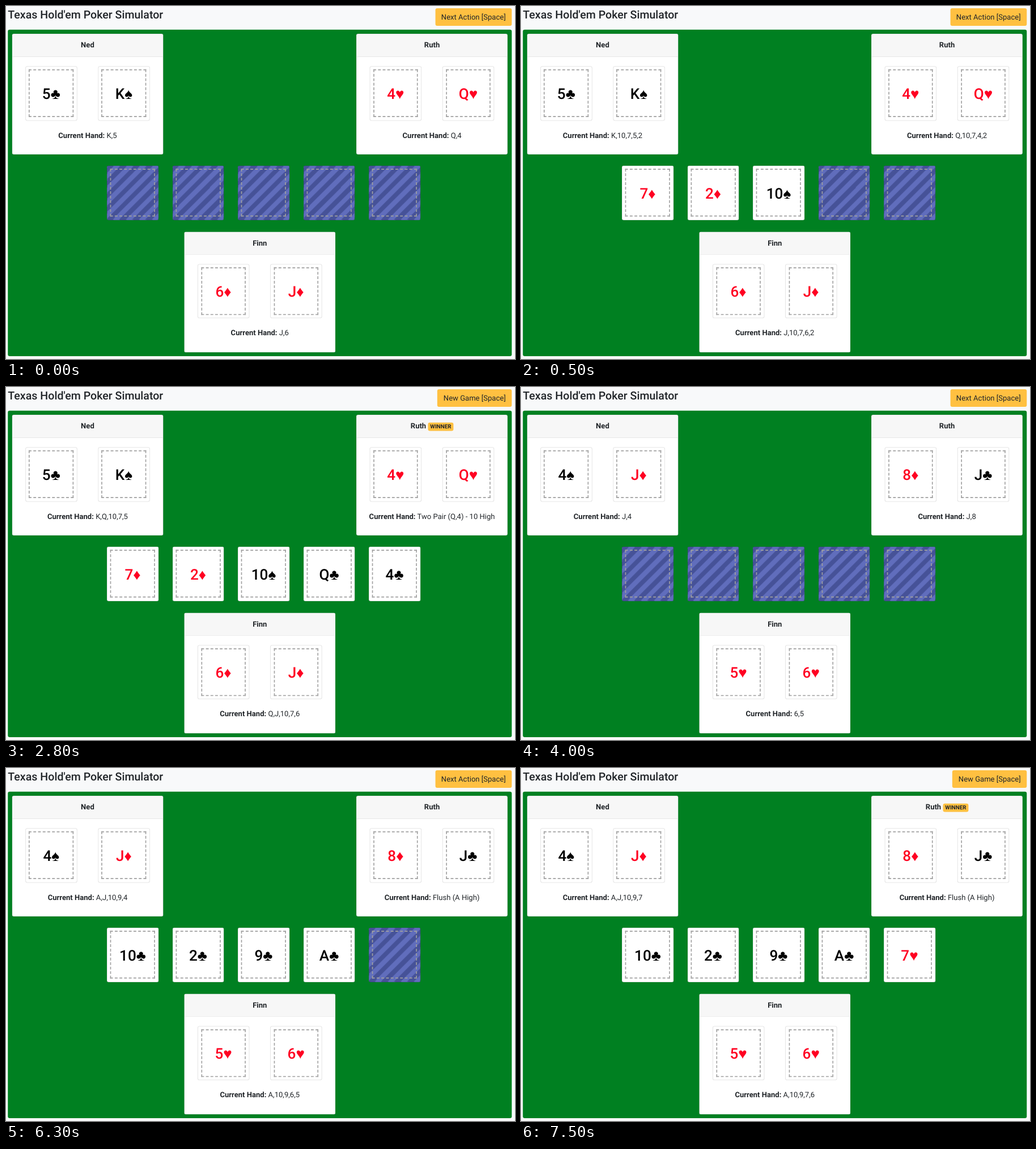
An HTML page for the animation above (8000 ms loop, 898 by 623 pixels).

```html
<!DOCTYPE html>
<html lang="en">
<head>
<meta charset="utf-8">
<title>Texas Hold'em Poker Simulator</title>
<style>
  * { box-sizing: border-box; }
  html, body { margin: 0; width: 100%; height: 100%; overflow: hidden; background: #f8f9fa; }
  #stage {
    position: absolute; left: 0; top: 0; width: 1100px; height: 764px;
    transform: scale(.81636); transform-origin: 0 0;
    font: 16px/24px Roboto, "Liberation Sans", sans-serif;
    color: #212529; text-rendering: geometricPrecision;
  }
  #stage > *, .card, .hand { position: absolute; }
  h1 { margin: 0; left: 4px; top: 5px; font-size: 24px; font-weight: 500; line-height: 28.8px; white-space: nowrap; }
  #action {
    right: 7px; top: 5px; height: 38px; padding: 7px 13px;
    border-radius: 4px; background: #ffc041; white-space: nowrap;
  }
  #table { left: 4px; top: 51px; width: 1089px; height: 706px; border-radius: 4px; background: #008021; }
  .player, .card { border: 1px solid rgba(0, 0, 0, .125); border-radius: 4px; background: #fff; }
  .player { width: 326.7px; height: 261px; text-align: center; }
  .name {
    height: 49px; padding: 12px 0; font-weight: 700;
    background: #f7f7f7; border-bottom: 1px solid rgba(0, 0, 0, .125); border-radius: 3px 3px 0 0;
  }
  .badge {
    display: inline-block; margin-left: 4px; padding: 3px 4.8px; border-radius: 4px;
    font-size: 12px; line-height: 1; vertical-align: baseline; background: #ffc041;
  }
  .card { width: 111.5px; height: 117.5px; padding: 6.4px; }
  .face {
    width: 100%; height: 100%; padding-top: 3px; border: 2px dashed #a0a0a0;
    display: flex; align-items: center; justify-content: center;
    font-size: 32px; font-weight: 500; line-height: 38.4px; color: #000;
  }
  .red .face { color: #ff0022; }
  .back { background: repeating-linear-gradient(-45deg, #606dbc 0 10px, #465298 10px 20px); }
  .hand { left: 0; right: 0; top: 206.5px; white-space: nowrap; }
</style>
</head>
<body>
<div id="stage">
  <h1>Texas Hold'em Poker Simulator</h1>
  <div id="action"></div>
  <div id="table"></div>
</div>
<script>
const LOOP = 8000;
const stage = document.getElementById('stage');
const action = document.getElementById('action');

const games = [
  { board: ['7♦', '2♦', '10♠', 'Q♣', '4♣'], pockets: [['5♣', 'K♠'], ['4♥', 'Q♥'], ['6♦', 'J♦']] },
  { board: ['10♣', '2♣', '9♣', 'A♣', '7♥'], pockets: [['4♠', 'J♦'], ['8♦', 'J♣'], ['5♥', '6♥']] }
];

// start time, game, open board cards, hand of each player
const steps = [
  [0,    0, 0, ['K,5', 'Q,4', 'J,6']],
  [500,  0, 3, ['K,10,7,5,2', 'Q,10,7,4,2', 'J,10,7,6,2']],
  [1600, 0, 4, ['K,Q,10,7,5', 'One Pair (Q) - 10,7,4 High', 'Q,J,10,7,6']],
  [2800, 0, 5, ['K,Q,10,7,5', 'Two Pair (Q,4) - 10 High', 'Q,J,10,7,6']],
  [4000, 1, 0, ['J,4', 'J,8', '6,5']],
  [5200, 1, 3, ['J,10,9,4,2', 'J,10,9,8,2', '10,9,6,5,2']],
  [6300, 1, 4, ['A,J,10,9,4', 'Flush (A High)', 'A,10,9,6,5']],
  [7500, 1, 5, ['A,J,10,9,7', 'Flush (A High)', 'A,10,9,7,6']]
];

function add(parent, cls, x, y) {
  const el = document.createElement('div');
  el.className = cls;
  if (x !== undefined) {
    el.style.left = x + 'px';
    el.style.top = y + 'px';
  }
  return parent.appendChild(el);
}

function addCard(parent, x, y) {
  const el = add(parent, 'card', x, y);
  add(el, 'face');
  return el;
}

function addPlayer(name, x, y) {
  const el = add(stage, 'player', x, y);
  const head = add(el, 'name');
  head.textContent = name;
  const badge = document.createElement('span');
  badge.className = 'badge';
  badge.textContent = 'WINNER';
  head.append(badge);
  const cards = [28, 185].map(left => addCard(el, left, 69));
  const line = add(el, 'hand');
  line.innerHTML = '<b>Current Hand:</b> <span></span>';
  return { badge, cards, hand: line.lastChild };
}

function showCard(el, value) {
  el.className = 'card' + (!value ? ' back' : /[♥♦]/.test(value) ? ' red' : '');
  el.firstChild.textContent = value;
}

const players = [
  addPlayer('Ned', 13, 60),
  addPlayer('Ruth', 757.3, 60),
  addPlayer('Finn', 385.15, 487.5)
];
const board = [0, 1, 2, 3, 4].map(i => addCard(stage, 218 + 141.5 * i, 345));

function show([, g, open, hands]) {
  const game = games[g];
  const over = open === 5;
  action.textContent = (over ? 'New Game' : 'Next Action') + ' [Space]';
  board.forEach((el, i) => showCard(el, i < open ? game.board[i] : ''));
  players.forEach((p, i) => {
    p.cards.forEach((el, j) => showCard(el, game.pockets[i][j]));
    p.hand.textContent = hands[i];
    p.badge.style.display = over && i === 1 ? '' : 'none';
  });
}

let current;
const start = performance.now();
function tick(now) {
  const t = Math.max(0, now - start) % LOOP;
  const step = steps.filter(s => s[0] <= t).pop();
  if (step !== current) show(current = step);
  requestAnimationFrame(tick);
}
tick(start);
</script>
</body>
</html>
```
